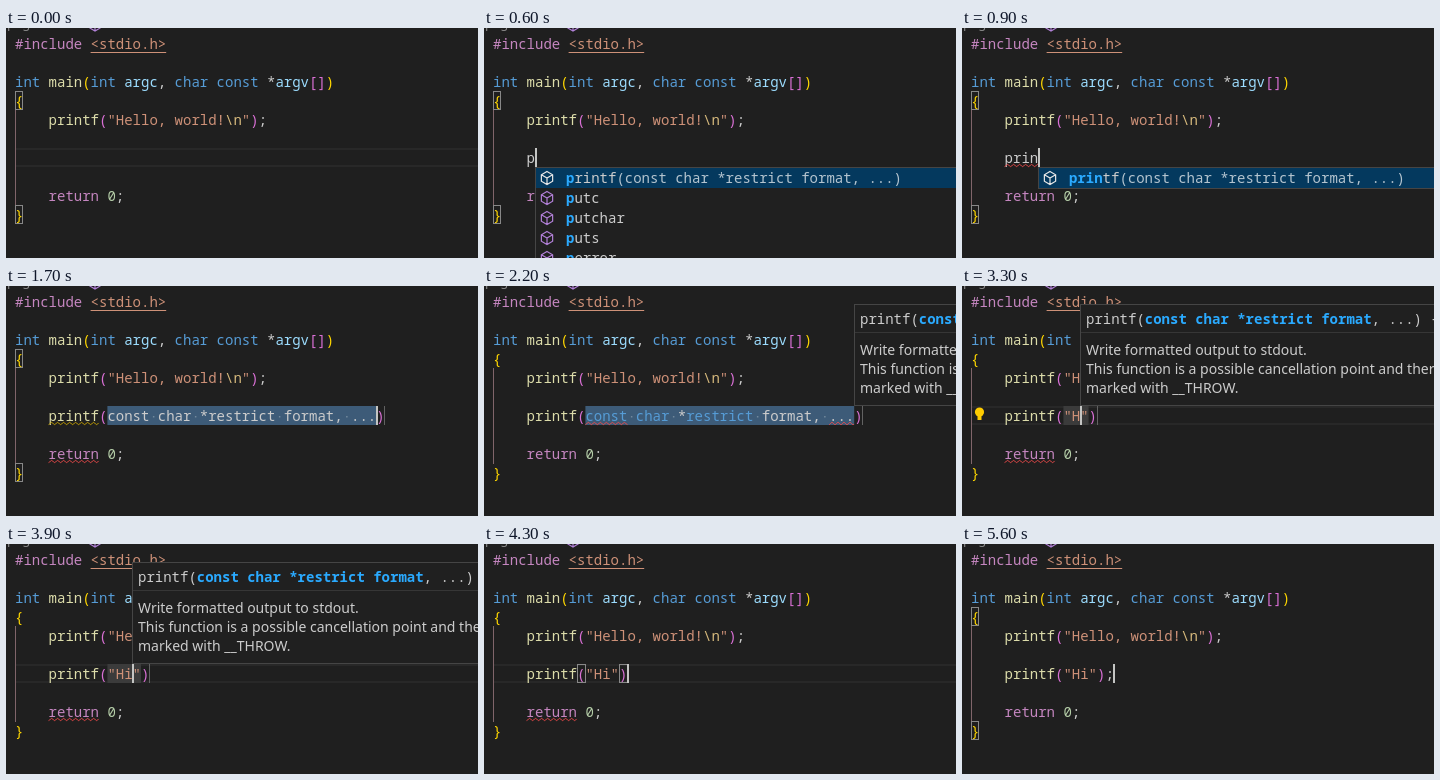
An HTML page with a canvas for the animation above (5.8 s loop, 472 px wide and 230 px high).

```html
<!DOCTYPE html>
<html lang="en">
<head>
<meta charset="utf-8">
<title>Code editor</title>
<style>
html, body { margin: 0; width: 100%; height: 100%; overflow: hidden; background: #1f1f1f; }
canvas { display: block; }
</style>
</head>
<body>
<canvas width="472" height="230"></canvas>
<script>
const ctx = document.querySelector('canvas').getContext('2d');
const LOOP = 5800, CH = 8.4, LINE = 19, LEFT = 9, INDENT = LEFT + 4 * CH;
const MONO = '14px "Noto Sans Mono", monospace';
const SANS = '14px "Noto Sans", sans-serif';

// Each run of text starts with the key of its colour.
const COLORS = {
  m: '#c586c0', s: '#ce9178', k: '#569cd6', f: '#dcdcaa', p: '#9cdcfe',
  g: '#ffd700', o: '#da70d6', e: '#d7ba7d', n: '#b5cea8', w: '#cccccc',
  b: '#2aaaff', l: '#b4c4cf'
};
const LINES = [
  [0, 0, 'm#include |s<stdio.h>'],
  [2, 0, 'kint |fmain|g(|kint |pargc|w, |kchar const |w*|pargv|o[]|g)'],
  [3, 0, 'g{'],
  [4, 4, 'fprintf|o(|s"Hello, world!|e\\n|s"|o)|w;'],
  [8, 4, 'mreturn |n0|w;'],
  [9, 0, 'g}']
];
const ARGS = 'const char *restrict format, ...';
const call = str => `fprintf|o(|s"${str}"|o)`;
const TYPED = [
  [0, 'w'], [500, 'wp'], [700, 'wpr'], [800, 'wpri'], [900, 'wprin'],
  [1000, `fprintf|o(|w${ARGS}|o)`],
  [1800, 'fprintf|o(|kconst char |w*|krestrict |wformat, ...|o)'],
  [3000, call('')], [3300, call('H')], [3600, call('Hi')], [4600, call('Hi') + '|w;']
];
const COLUMN = [
  [0, 0], [500, 1], [700, 2], [800, 3], [900, 4], [1000, 39],
  [3000, 8], [3300, 9], [3600, 10], [4100, 11], [4200, 12], [4600, 13]
];
const BLINK = [[0, 0], [300, 1], [2200, 0], [2700, 1], [5100, 0], [5600, 1]];

const step = (list, t) => list.filter(([start]) => start <= t).pop()[1];
const within = (t, a, b) => t >= a && t < b;
const rowY = row => 6 + row * LINE;
const colX = col => INDENT + col * CH;

function rect(x, y, w, h, color) {
  ctx.fillStyle = color;
  ctx.fillRect(x, y, w, h);
}

function box(x, y, w, h, color) {
  ctx.lineWidth = 1;
  ctx.strokeStyle = color;
  ctx.strokeRect(Math.floor(x) + 0.5, y + 0.5, w, h);
}

function runs(text, x, y) {
  for (const run of text.split('|')) {
    const str = run.slice(1);
    ctx.font = (run[0] === 'b' ? 'bold ' : '') + MONO;
    ctx.fillStyle = COLORS[run[0]];
    ctx.fillText(str, x, y);
    x += str.length * CH;
  }
  return x;
}

function squiggle(col, len, row, color) {
  const x = colX(col), y = rowY(row) + 17.5;
  ctx.beginPath();
  for (let i = 0; i <= len * CH; i += 0.5)
    ctx.lineTo(x + i, y + 1.1 * Math.cos(i * Math.PI / 3));
  ctx.lineWidth = 1;
  ctx.strokeStyle = color;
  ctx.stroke();
}

function cube(x, y, r, color) {
  const point = i => [x + r * Math.sin(i * Math.PI / 3), y - r * Math.cos(i * Math.PI / 3)];
  ctx.beginPath();
  for (let i = 0; i < 6; i++) ctx.lineTo(...point(i));
  ctx.closePath();
  for (const i of [1, 3, 5]) {
    ctx.moveTo(x, y);
    ctx.lineTo(...point(i));
  }
  ctx.lineWidth = 1.2;
  ctx.strokeStyle = color;
  ctx.stroke();
}

function suggestions(col, many) {
  const x = Math.floor(colX(col)), word = 'printf';
  const items = [`b${word.slice(0, col)}|w${word.slice(col)}|l(${ARGS})`];
  if (many) items.push('bp|wutc', 'bp|wutchar', 'bp|wuts', 'bp|werror');
  const h = items.length * 20;
  rect(x, 139, 430, h + 2, '#202020');
  rect(x, 140, 430, 20, '#04395e');
  box(x, 139, 430, h + 1, '#454545');
  items.forEach((item, i) => {
    cube(x + 12, 150 + i * 20, 6.5, i ? '#b180d7' : '#e8e8e8');
    runs(item, x + 31, 155 + i * 20);
  });
}

function signature(col) {
  const x = Math.floor(colX(col));
  rect(x, 18, 520, 102, '#202020');
  box(x, 18, 520, 101, '#454545');
  rect(x + 1, 46, 520, 1, '#363636');
  runs('wprintf(|bconst char *restrict format|w, ...) -> int', x + 6, 38);
  ctx.font = SANS;
  ctx.fillStyle = COLORS.w;
  ['Write formatted output to stdout.',
   'This function is a possible cancellation point and therefore not',
   'marked with __THROW.'].forEach((str, i) => ctx.fillText(str, x + 6, 69 + i * LINE));
}

function bulb() {
  ctx.fillStyle = '#ffcc00';
  ctx.beginPath();
  ctx.arc(17.5, 126, 4.6, 0, 7);
  ctx.fill();
  rect(15.5, 130, 4, 4, '#ffcc00');
}

function draw(t) {
  const y = rowY(6), col = step(COLUMN, t), snippet = within(t, 1000, 3000);
  rect(0, 0, 472, 230, '#1f1f1f');

  // breadcrumb cut off by the top edge
  ctx.font = '13px "Noto Sans", sans-serif';
  ctx.fillStyle = '#8a8a8a';
  ctx.fillText('page.c', 1, 0);
  cube(89, -3, 6, '#b180d7');

  if (t < 500 || within(t, 3000, 4400)) {
    rect(LEFT, y, 472, 2, '#282828');
    rect(LEFT, y + 17, 472, 2, '#282828');
  }
  rect(LEFT, 82, 1, 96, '#80656a');
  if (t < 1800 || t >= 4600)
    for (const row of [3, 9]) box(LEFT, rowY(row), 7, 18, '#888888');
  if (within(t, 4200, 4600))
    for (const c of [6, 11]) box(colX(c), y, 8, 18, '#888888');

  if (snippet) rect(colX(7), y, ARGS.length * CH, LINE, '#3d5b78');
  else if (within(t, 3000, 4200))
    rect(colX(7), y, (t < 3300 ? 2 : t < 3600 ? 3 : 4) * CH, LINE, '#3b3b3b');

  for (const [row, indent, text] of LINES)
    runs(text, LEFT + indent * CH, rowY(row) + 15);
  rect(LEFT + 9 * CH, 24, 9 * CH, 1, COLORS.s);
  const end = runs(step(TYPED, t), INDENT, y + 15);

  if (snippet)
    [...ARGS].forEach((c, i) => {
      if (c === ' ') rect(colX(7 + i) + 3.5, y + 10, 1.5, 1.5, '#71889c');
    });
  if (within(t, 1000, 4200)) rect(Math.floor(end), y, 1, LINE, '#626262');

  if (within(t, 900, 1000)) squiggle(0, 4, 6, '#f14c4c');
  if (within(t, 1100, 1800)) squiggle(0, 6, 6, '#cca700');
  if (within(t, 1800, 3000)) {
    squiggle(7, 5, 6, '#f14c4c');
    squiggle(36, 3, 6, '#f14c4c');
  }
  if (within(t, 1200, 2000) || within(t, 3100, 4700)) squiggle(0, 6, 8, '#f14c4c');

  if (within(t, 3300, 3900)) bulb();
  if (within(t, 600, 1000)) suggestions(col, t < 700);
  if (within(t, 1800, 4200)) signature(t < 3100 ? 39 : col);
  if (step(BLINK, t)) rect(Math.floor(colX(col)), y, 2, LINE, '#c4c5c3');
}

const start = performance.now();
function tick() {
  draw((performance.now() - start) % LOOP);
  requestAnimationFrame(tick);
}
tick();
</script>
</body>
</html>
```
